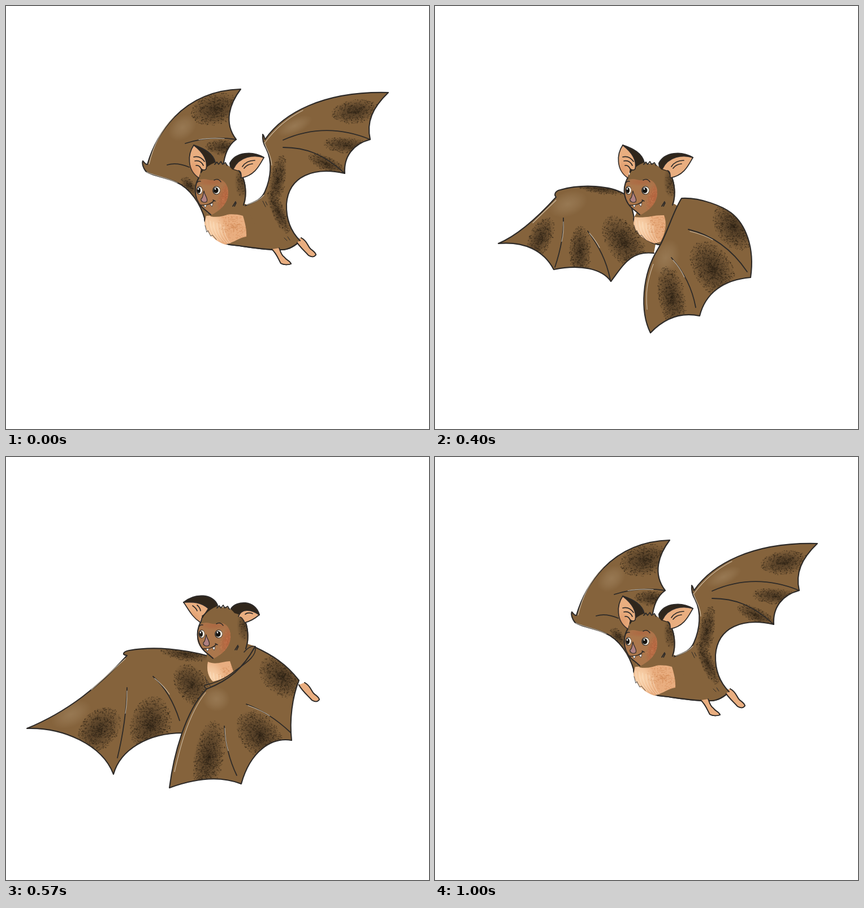
An HTML page with a canvas for the animation above (1.03 s loop, 748x748 px).

```html
<!DOCTYPE html>
<html lang="en">
<head>
<meta charset="utf-8">
<title>Flying bat</title>
<style>
html, body { margin: 0; width: 100%; height: 100%; overflow: hidden; background: #fff; }
canvas { display: block; }
</style>
</head>
<body>
<canvas id="stage" width="748" height="748"></canvas>
<script>
const SIZE = 748, LOOP = 1030;
const BROWN = '#85633c', INK = '#2d2a28', SKIN = '#e9ae80', DARK = '#30261b';
let ctx, seed;

const random = () => (seed = (seed * 16807) % 2147483647) / 2147483647;

// Wing outlines start and end at the body, so the stroke stays open there.
// shade and glow entries: x, y, rx, ry, degrees.
const farHigh = {
  path: 'M352 378C344 350 326 322 300 311C280 302 256 300 247 292C243 287 240 279 242 274C246 278 247 281 250 280C264 232 308 150 415 147C396 172 384 206 407 236C393 246 386 262 384 285',
  bones: 'M407 236C375 231 345 234 317 243M285 281C298 277 312 280 324 285',
  shine: 'M252 278C260 242 276 215 296 194M248 292C262 299 285 302 302 311M340 235C355 232 370 232 385 233',
  shade: [[370, 182, 44, 28, -15], [384, 250, 32, 14, 5], [324, 318, 20, 10, 50]],
  glow: [[312, 215, 28, 20, -40]]
};
const nearHigh = {
  path: 'M423 353C442 346 452 342 458 328C468 305 472 275 460 252C456 245 453 236 454 227C457 230 457 234 458 236C490 190 560 150 676 153C648 180 637 205 644 236C614 244 597 266 599 296C545 284 500 300 496 350C495 380 505 400 520 415',
  bones: 'M644 236C590 214 540 215 490 237M599 296C562 262 530 250 490 250',
  shine: 'M457 240C476 214 500 195 524 183M456 240C460 254 468 262 469 280M425 350C440 345 448 341 455 333',
  shade: [[617, 186, 42, 21, -8], [602, 246, 42, 14, 5], [567, 279, 36, 13, 25], [480, 308, 14, 46, 10], [482, 365, 12, 42, -25]],
  glow: [[510, 212, 34, 14, -25]]
};
const farLevel = {
  path: 'M352 382C335 368 310 366 290 366C240 367 208 400 200 441C180 412 155 408 126 409C140 345 190 285 270 283C300 277 325 283 342 302',
  bones: 'M347 364C320 318 280 292 240 311C227 314 236 300 268 284M200 441C204 390 220 345 238 314',
  shine: 'M148 365C166 328 192 307 225 295M203 410C207 380 215 360 224 342M236 310C244 302 256 300 266 299',
  shade: [[305, 340, 54, 22, 25], [240, 352, 36, 24, -35]],
  glow: [[165, 375, 30, 25, -50]]
};
const nearLevel = {
  path: 'M423 353C450 335 484 325 483 303C482 292 474 289 468 284C474 280 480 283 486 280C520 272 590 294 604 335C613 355 630 372 646 388C618 388 592 404 586 435C568 418 548 418 528 430C527 424 528 412 527 400C526 374 514 372 511 390C511 402 516 408 520 415',
  bones: 'M528 430C530 385 520 330 470 285M586 435C586 370 562 310 512 282',
  shine: 'M572 342C580 362 582 385 583 405M425 350C440 342 455 337 465 330',
  shade: [[490, 355, 30, 44, -20], [554, 370, 21, 56, -5], [612, 370, 32, 24, 35]],
  glow: [[505, 290, 20, 8, 20]]
};
const farSpread = {
  path: 'M352 380C338 350 315 335 285 335C262 335 245 345 238 366C224 336 206 326 186 322C200 260 235 215 285 222C310 240 325 262 342 300',
  bones: 'M345 352C325 300 290 262 250 268C240 268 246 258 272 230M238 366C236 330 242 295 250 272',
  shine: 'M204 288C216 260 235 240 258 230M240 340C240 320 244 300 249 286M252 266C260 263 270 264 277 268',
  shade: [[315, 320, 38, 16, 40], [270, 305, 28, 20, 0]],
  glow: [[218, 290, 22, 20, -50]]
};
const nearSpread = {
  path: 'M423 353C448 345 466 320 468 290C469 265 462 250 455 240C462 240 464 238 468 234C520 170 640 150 698 236C668 236 648 256 648 284C622 272 596 286 588 316C552 302 520 320 508 350C502 380 510 400 520 415',
  bones: 'M648 284C600 236 540 225 480 240M588 316C560 275 520 258 478 262',
  shine: 'M470 235C490 213 515 200 540 191M425 350C440 345 448 341 455 333',
  shade: [[643, 220, 38, 20, 15], [602, 266, 35, 13, 30], [485, 330, 17, 45, 0]],
  glow: [[520, 220, 35, 15, -20]]
};
const nearRising = {
  path: 'M423 353C450 340 474 325 476 298C476 275 468 262 461 255C467 254 470 252 474 248C520 206 610 205 645 310C620 308 602 326 600 352C578 340 562 350 556 376C530 362 512 372 510 392C511 402 516 408 520 415',
  bones: 'M600 352C580 300 540 265 485 255M556 376C548 330 520 290 480 272',
  shine: 'M477 248C492 236 510 228 530 226M425 350C440 343 452 338 462 330',
  shade: [[607, 290, 32, 20, 45], [555, 325, 18, 36, -25], [490, 345, 22, 40, -10]],
  glow: [[520, 250, 30, 12, 0]]
};
const farLow = {
  path: 'M387 437C345 432 332 460 311 487C296 465 258 456 210 466C192 432 158 416 112 420C150 404 185 370 214 338C209 332 215 326 222 325C262 314 310 318 334 332C345 345 350 360 352 376',
  bones: 'M227 375C228 405 222 432 212 462M270 398C290 425 303 450 310 484',
  shine: 'M172 382L213 342M226 380q1 20-3 35M272 400q12 14 18 26',
  shade: [[186, 410, 20, 40, 25], [256, 434, 19, 46, 0], [334, 418, 30, 54, -35], [293, 323, 44, 9, 8]],
  glow: [[235, 350, 36, 22, -20]]
};
const nearLow = {
  path: 'M394 430C410 405 420 365 436 340C470 338 510 355 524 366C548 385 566 425 558 480C510 484 478 508 468 548C430 540 402 556 381 578C362 540 366 475 394 430',
  bones: 'M448 395C490 405 525 430 552 470M418 445C440 470 455 500 461 533',
  shine: 'M385 455C372 490 372 510 374 535M450 397q25 6 40 15M420 448q12 13 20 30',
  shade: [[528, 390, 32, 46, -35], [490, 464, 34, 54, -30], [418, 514, 24, 56, -10]],
  glow: [[408, 445, 24, 34, 20]]
};
const farDive = {
  path: 'M380 470C355 480 335 488 313 488C250 488 202 518 190 561C170 508 100 478 37 480C110 450 165 405 214 351C204 350 207 344 218 342C262 334 315 340 358 352C362 362 358 375 357 395',
  bones: 'M214 408C213 450 206 495 197 532M260 388C285 410 298 438 307 466',
  shine: 'M150 410L210 355M213 412q0 25-3 40M262 390q18 15 26 28',
  shade: [[164, 482, 32, 46, 40], [255, 474, 36, 52, 10], [328, 402, 28, 40, -35], [318, 348, 46, 12, 8]],
  glow: [[115, 455, 38, 22, -25]]
};
const nearDive = {
  path: 'M355 410C395 395 420 372 440 336C470 350 495 365 518 395C506 425 501 465 505 501C470 495 432 520 416 578C375 562 330 570 289 585C296 530 316 450 355 410',
  bones: 'M425 437C460 450 485 470 503 487M386 476C388 510 397 540 408 563',
  shine: 'M352 415C320 455 305 520 297 555M427 438q25 9 38 18M386 478q1 25 6 40',
  shade: [[488, 388, 46, 32, 40], [448, 492, 34, 50, -40], [358, 530, 26, 66, 10]],
  glow: [[372, 428, 24, 22, 0]]
};

const chestSquare = 'M354 371C375 371 400 365 419 371C423 384 426 397 425 408C413 409 406 417 388 422C370 416 354 402 351 384Z';
const chestSlant = 'M354 373C372 380 389 370 402 376C405 391 417 400 425 411C416 417 403 418 389 421C370 416 354 402 351 384Z';
const chestRound = 'M354 373C372 379 396 366 414 374C422 387 424 400 423 409C412 413 405 419 389 422C370 416 354 402 351 384Z';
const chestNarrow = 'M353 373C370 376 388 369 405 370C411 385 407 402 399 417L388 420C370 414 354 402 351 384Z';
const chestDive = 'M357 362C370 368 383 362 396 361L402 379C390 390 378 394 366 397C358 390 354 376 357 362Z';

// Interpolates every number in two wings of the same structure.
function mixWings(a, b, t) {
  const number = /-?\d+(\.\d+)?/g, other = JSON.stringify(b).match(number);
  let i = 0;
  return JSON.parse(JSON.stringify(a).replace(number, n => {
    const value = +n + (other[i++] - n) * t;
    return (value < 0 ? '' : ' ') + value.toFixed(1);
  }));
}

const fill = (path, color) => { ctx.fillStyle = color; ctx.fill(new Path2D(path)); };
function stroke(path, color = INK, width = 2.1) {
  ctx.strokeStyle = color;
  ctx.lineWidth = width;
  ctx.stroke(new Path2D(path));
}
function shape(path, color, width) { fill(path, color); stroke(path, INK, width); }

function ellipse(x, y, rx, ry, color) {
  ctx.fillStyle = color;
  ctx.beginPath();
  ctx.ellipse(x, y, rx, ry, 0, 0, 2 * Math.PI);
  ctx.fill();
}

function soft([x, y, rx, ry, angle = 0], rgb, alpha) {
  ctx.save();
  ctx.translate(x, y);
  ctx.rotate(angle * Math.PI / 180);
  ctx.scale(rx, ry);
  const gradient = ctx.createRadialGradient(0, 0, 0, 0, 0, 1);
  gradient.addColorStop(0, `rgba(${rgb},${alpha})`);
  gradient.addColorStop(0.5, `rgba(${rgb},${alpha * 0.6})`);
  gradient.addColorStop(1, `rgba(${rgb},0)`);
  ctx.fillStyle = gradient;
  ctx.fillRect(-1, -1, 2, 2);
  ctx.restore();
}

function grain([x, y, rx, ry, angle = 0], color, density) {
  const turn = angle * Math.PI / 180, cos = Math.cos(turn), sin = Math.sin(turn);
  ctx.fillStyle = color;
  for (let n = rx * ry * density; n > 0; n--) {
    const a = random() * 2 * Math.PI, r = random() ** 0.75;
    const u = Math.cos(a) * r * rx, v = Math.sin(a) * r * ry;
    ctx.fillRect(x + u * cos - v * sin, y + u * sin + v * cos, 0.8 + random() * 1.5, 0.8 + random());
  }
}

function charcoal(area) {
  soft(area, '45,34,22', 0.65);
  grain(area, 'rgba(42,32,21,.5)', 0.5);
}

function inside(path, draw) {
  ctx.save();
  ctx.clip(new Path2D(path));
  draw();
  ctx.restore();
}

function drawWing(wing, base = '') {
  fill(wing.path + base, BROWN);
  inside(wing.path + base, () => {
    wing.glow.forEach(area => soft(area, '190,165,130', 0.32));
    wing.shade.forEach(charcoal);
  });
  stroke(wing.path);
  stroke(wing.bones, INK, 1.8);
  ctx.save();
  ctx.translate(1, 1.5);
  stroke(wing.shine, 'rgba(226,211,190,.75)', 1.2);
  ctx.restore();
}

const farFoot = 'M512 414C518 425 528 433 535 441C540 444 545 444 548 440C547 435 542 433 538 429C533 424 533 416 522 410';
const nearFoot = 'M470 430C478 437 481 446 486 455C491 458 499 458 504 456C503 451 496 450 492 444C486 440 486 435 483 428';

function drawBody() {
  const outline = 'M522 414C510 425 500 431 488 431C460 432 430 426 404 423C375 421 354 402 351 376';
  fill(outline + 'L362 356L423 350Z', BROWN);
  stroke(outline);
  shape(farFoot, SKIN, 1.8);
  shape(nearFoot, SKIN, 1.8);
}

function drawDivingBody() {
  ctx.save();
  ctx.translate(6, -11);
  shape(farFoot, SKIN, 1.8);
  ctx.restore();
  fill('M355 345L425 330L441 335L415 381L358 410L354 375Z', BROWN);
}

function drawChest(path) {
  fill(path, SKIN);
  inside(path, () => {
    soft([365, 390, 24, 34, -25], '255,224,188', 0.75);
    grain([402, 390, 28, 22, 20], 'rgba(205,130,78,.4)', 0.45);
    for (let i = 0; i < 6; i++)
      stroke(`M${355 + i * 6} ${378 + i * 2}q0 20 14 34`, 'rgba(255,236,210,.6)', 1);
  });
  stroke('M352 388l3 12l2-3l5 10l3-2l7 8', INK, 0.8);
}

const uprightEars = {
  backs: ['M332 246C350 252 366 260 370 277L362 298L345 295Z', 'M456 268C436 256 406 258 396 278L398 294L412 300Z'],
  inners: ['M341 304C320 290 321 262 332 246C345 256 358 270 354 288C352 291 348 290 345 288',
    'M402 288C412 266 438 262 456 268C448 282 440 300 416 304C416 298 416 292 411 291'],
  folds: 'M332 267q11-3 19 8M334 274q10-2 15 8M336 282q6-1 9 6M440 273q-15 0-22 11M436 279q-10 1-15 8'
};
const loweredEars = {
  backs: ['M314 257C335 240 366 242 374 262L366 282L345 285Z', 'M398 268C408 254 440 252 448 279L422 286L402 286Z'],
  inners: ['M343 292C328 282 322 268 314 257C330 256 345 256 358 268C354 274 351 280 347 281',
    'M411 282C416 268 432 268 448 279C441 285 434 290 422 293C420 288 418 284 414 283'],
  folds: 'M330 263q6 4 8 9M338 262q5 4 6 10M436 277q-8-3-13 1'
};

function drawInnerEars({ inners, folds }) {
  inners.forEach(path => {
    shape(path, SKIN, 1.7);
    inside(path, () => soft([332, 290, 14, 20], '210,125,75', 0.35));
  });
  stroke(folds, INK, 1.7);
}

function drawHead() {
  const skull = 'M421 353C428 335 425 305 413 293L400 289C392 279 385 277 378 279L369 277C352 284 343 295 340 308C331 323 333 347 355 362L362 372C382 376 405 365 421 353Z';
  fill(skull, BROWN);
  inside(skull, () => {
    soft([418, 310, 14, 30], '45,34,22', 0.5);
    grain([416, 312, 10, 24], 'rgba(42,32,21,.45)', 0.3);
  });
  const face = 'M340 309C350 302 360 310 368 308C382 302 394 314 393 332C392 350 378 362 364 369C345 358 330 345 335 322Z';
  fill(face, '#ab774c');
  inside(face, () => {
    soft([387, 338, 13, 34, 15], '186,88,54', 0.65);
    soft([364, 311, 26, 8], '176,88,55', 0.45);
    grain([384, 342, 11, 24, 20], 'rgba(205,130,88,.45)', 0.4);
  });
  stroke('M413 293C423 305 427 332 420 352M340 305C331 323 332 347 354 362L362 369M340 306l2-6l-1-7l5-7');
  stroke('M369 280l4-4l3 4l4-5l3 5l5-3l3 5M401 354l5-8M404 354l3-6', INK, 1.8);
  stroke('M368 308q7-4 12 3M338 312q3-3 6-2', INK, 1.5);
  for (const [x, rx] of [[372, 6], [342, 4.5]]) {
    ellipse(x, 326, rx + 1, 7.5, INK);
    ellipse(x + 0.5, 326, rx, 6.5, '#f3ece0');
    ellipse(x - 1, 326, rx - 1.5, 5, '#171512');
    ellipse(x - 2, 323.5, 1.2, 1.4, '#fff');
  }
  shape('M350 327C351 335 358 340 355 346C350 349 344 346 345 341C349 339 348 334 350 327Z', '#ad8080', 1.2);
  stroke('M345 352C354 353 363 350 368 344M366 343l4 2', INK, 1.5);
  shape('M350 352l2 5l3-5Z', '#fff', 0.7);
  shape('M361 350l3 5l2-6Z', '#fff', 0.7);
}

function renderPose({ far, near, chest, diving, folded }) {
  const canvas = document.createElement('canvas');
  canvas.width = canvas.height = SIZE;
  ctx = canvas.getContext('2d');
  ctx.lineCap = ctx.lineJoin = 'round';
  seed = 4271;
  const ears = diving ? loweredEars : uprightEars;
  if (diving) drawDivingBody(); else drawBody();
  drawWing(far, folded ? 'L394 400Z' : '');
  if (diving) drawDivingBody(); else drawBody();
  drawChest(chest);
  ears.backs.forEach(path => shape(path, DARK));
  ctx.save();
  if (diving) ctx.translate(4, -13);
  drawHead();
  ctx.restore();
  drawInnerEars(ears);
  drawWing(near, folded ? '' : 'L500 425L440 385Z');
  if (diving) {
    stroke('M355 410C348 406 349 402 362 401M421 345C427 338 434 333 441 335C444 352 425 364 405 378C390 390 372 400 352 403', INK, 1.6);
  } else if (!folded) {
    stroke('M454 345l5 10M459 346l3 6M492 410l5 5M498 408l4 6', INK, 1);
  }
  return canvas;
}

const high = renderPose({ far: farHigh, near: nearHigh, chest: chestSquare });
const shadedFar = { ...farLevel, shade: [...farLevel.shade, [158, 386, 38, 28, -40]] };
const shadedNear = { ...nearLevel, shade: [[502, 352, 24, 44, -20], [618, 366, 38, 24, 45]] };

// Each pose holds until the given time in ms.
const timeline = [
  [30, high],
  [200, renderPose({ far: farSpread, near: nearSpread, chest: chestSquare })],
  [400, renderPose({ far: farLevel, near: nearLevel, chest: chestSlant })],
  [470, renderPose({ far: farLow, near: nearLow, chest: chestNarrow, folded: true })],
  [570, renderPose({ far: mixWings(farLow, farDive, 0.5), near: mixWings(nearLow, nearDive, 0.5), chest: chestNarrow, folded: true })],
  [800, renderPose({ far: farDive, near: nearDive, chest: chestDive, diving: true, folded: true })],
  [830, renderPose({ far: shadedFar, near: shadedNear, chest: chestRound })],
  [1000, renderPose({ far: mixWings(farSpread, farLevel, 0.5), near: nearRising, chest: chestRound })],
  [LOOP, high]
];

const stage = document.getElementById('stage').getContext('2d');
function frame() {
  const time = performance.now() % LOOP;
  stage.fillStyle = '#fff';
  stage.fillRect(0, 0, SIZE, SIZE);
  stage.drawImage(timeline.find(([end]) => time < end)[1], 0, 0);
  requestAnimationFrame(frame);
}
frame();
</script>
</body>
</html>
```
